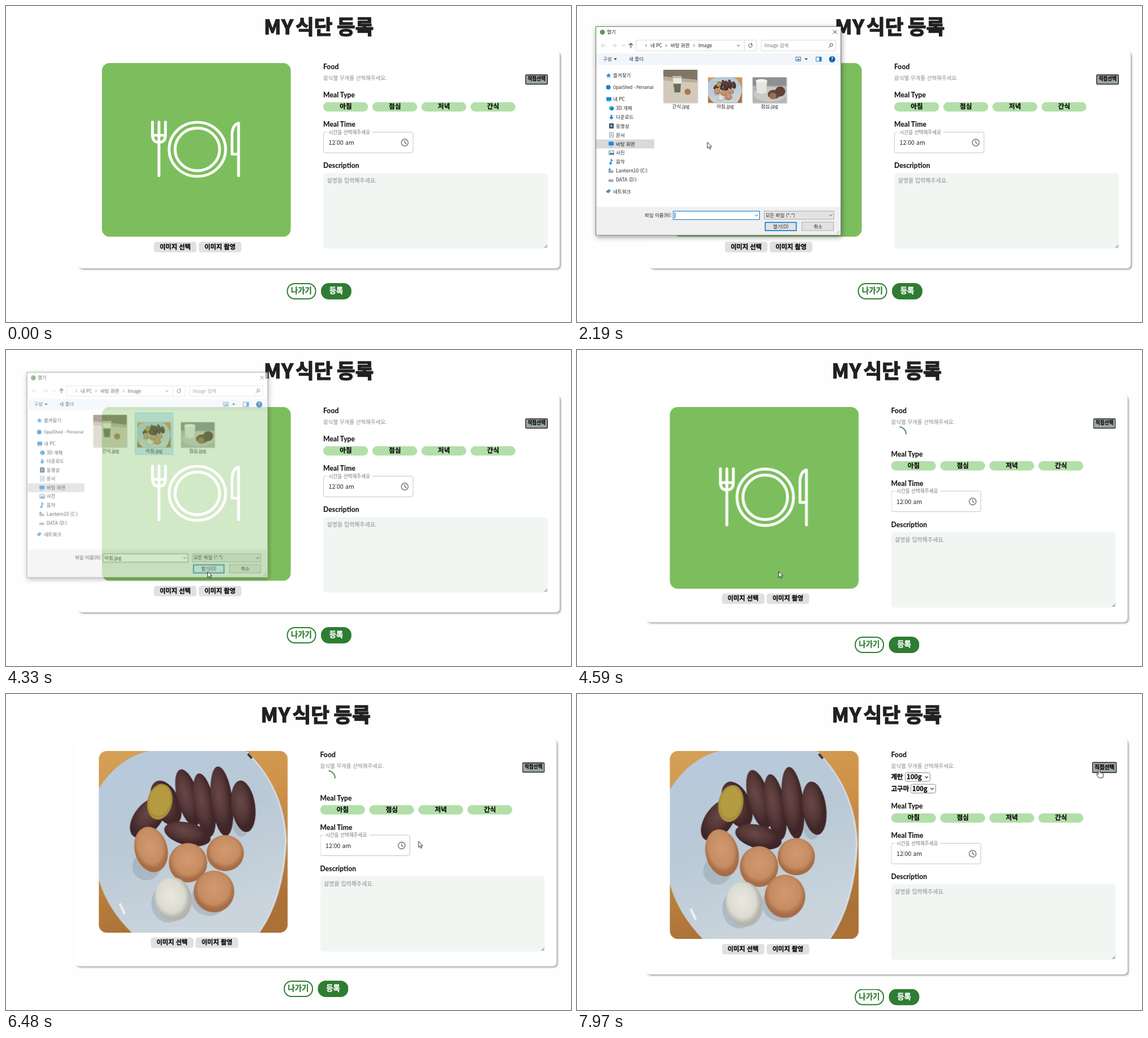
An HTML page that plays this animation: 1001 by 560 pixels, repeating every 8000 ms.

```html
<!DOCTYPE html>
<html lang="ko">
<head>
<meta charset="utf-8">
<title>식단 등록</title>
<style>
html, body { margin: 0; width: 100%; height: 100%; overflow: hidden; background: #fefefe; }
svg { display: block; width: 100vw; height: 100vh; }
text { font-family: 'Noto Sans CJK KR', 'Noto Sans CJK JP', 'Noto Sans KR', sans-serif; fill: #222; white-space: pre; }
.mid { text-anchor: middle; }
.heavy { font-weight: 900; color: #111; fill: currentColor; stroke: currentColor; stroke-width: .3; }
.title { font-size: 35.5px; color: #212121; stroke-width: 1.5; }
.label { font: 800 12.2px Lato, sans-serif; fill: #1a1a1a; }
.hint { fill: #8c8c8c; }
.line { fill: none; stroke: #444; }
.icon { fill: none; stroke: #fff; stroke-width: 5; stroke-linecap: round; stroke-linejoin: round; }
.small text { font-size: 8.5px; }
.potato { fill: url(#skin); }
.egg { fill: url(#shell); }

/* Page layout: picked file at 4590 ms, result at 6530 ms */
#page, #picture, #form, #imgButtons, #footer, #card, #spinnerBox, #weights, #photo,
#mark, #caret, #fileName, #field, #openButton, #pick, #arrow, #hand {
  animation: 8s step-end infinite;
}
#page { animation-name: page; }
#picture { transform: scaleY(.9565); animation-name: picture; }
#form { animation-name: form; }
#imgButtons { animation-name: imgButtons; }
#footer { animation-name: footer; }
#card { height: 385px; animation-name: card; filter: drop-shadow(2.5px 2.5px 1.5px rgba(0,0,0,.36)); }
#spinnerBox, #weights, #photo, #fileName, #mark, #hand { opacity: 0; }
#spinnerBox { animation-name: loading; }
#weights { animation-name: loaded; }
#photo { animation-name: photo; }
#spinner { transform-origin: 575.5px 149px; animation: spin 8s linear infinite; }
@keyframes page { 57.375% { transform: translateX(-5.5px); } 100% { transform: translateX(-5.5px); } }
@keyframes picture { 57.375% { transform: none; } 81.625% { transform: scaleY(1.0345); } }
@keyframes form { 57.375% { transform: translateY(26.5px); } 81.625% { transform: translateY(41px); } }
@keyframes imgButtons { 57.375% { transform: translateY(13.5px); } 81.625% { transform: translateY(25px); } }
@keyframes footer { 57.375% { transform: translateY(17px); } 81.625% { transform: translateY(31.5px); } }
@keyframes card { 57.375% { height: 402.5px; } 81.625% { height: 417px; } }
@keyframes loading { 57.375% { opacity: 1; } 81.625% { opacity: 0; } }
@keyframes loaded { 81.625% { opacity: 1; } }
@keyframes photo { 58.25% { opacity: 1; } }
@keyframes spin { 0%, 57.375% { transform: rotate(0); } 81.625%, 100% { transform: rotate(739deg); } }

/* File dialog */
#dialog { opacity: 0; transform-origin: 250px 221px; animation: dialog 8s linear infinite; filter: drop-shadow(1.5px 3px 5px rgba(0,0,0,.4)); }
#mark { fill: #e5f3ff; stroke: #e5f3ff; animation-name: mark; }
#caret { animation-name: caret; }
#fileName { animation-name: fileName; }
#field { fill: #fff; stroke: #0078d7; animation-name: field; }
#openButton { fill: #e1e1e1; stroke: #0078d7; stroke-width: 1.6; animation-name: openButton; }
@keyframes dialog {
  0%, 19.6% { opacity: 0; transform: scale(.93); }
  21.6%, 53.8% { opacity: 1; transform: none; }
  54.8%, 100% { opacity: 0; transform: scale(.95); }
}
@keyframes mark { 30% { opacity: 1; } 32.5% { opacity: 1; fill: #cce8ff; stroke: #99d1ff; } }
@keyframes caret { 32.5% { opacity: 0; } }
@keyframes fileName { 32.5% { opacity: 1; } }
@keyframes field { 32.5% { stroke: #8a8a8a; } }
@keyframes openButton { 40.8% { fill: #dcebf7; } }

/* Pointer */
#pointer { animation: move 8s linear infinite; }
#pick { transform-origin: 940px 130px; animation-name: grow; }
#arrow { animation-name: arrow; }
#hand { animation-name: hand; }
@keyframes move {
  0%, 2.9% { transform: translate(530px, 566px); animation-timing-function: ease-out; }
  10.75%, 12.3% { transform: translate(303px, 430px); }
  15% { transform: translate(309px, 433px); }
  17.5%, 24.3% { transform: translate(307px, 429px); }
  27.375% { transform: translate(230.5px, 242px); animation-timing-function: ease-out; }
  30.75%, 32.5% { transform: translate(260px, 150px); animation-timing-function: ease-in-out; }
  41.6% { transform: translate(355px, 390.5px); }
  43.25%, 61% { transform: translate(357px, 392.5px); animation-timing-function: ease-in; }
  67% { transform: translate(533px, 284px); animation-timing-function: ease-out; }
  75%, 87.8% { transform: translate(730.5px, 261px); animation-timing-function: ease-in-out; }
  93.75% { transform: translate(918px, 135px); }
  97.9% { transform: translate(922px, 133px); }
  99.4%, 100% { transform: translate(925px, 132.5px); }
}
@keyframes grow { 93.75% { transform: scale(1.1); } }
@keyframes arrow { 93.75% { opacity: 0; } }
@keyframes hand { 93.75% { opacity: 1; } }
</style>
</head>
<body>
<svg viewBox="0 0 1001 560">
<defs>
  <linearGradient id="wood" x2=".25" y2="1">
    <stop stop-color="#d5a159"/><stop offset=".4" stop-color="#cf9248"/><stop offset="1" stop-color="#ab7136"/>
  </linearGradient>
  <linearGradient id="plate" x2=".35" y2="1">
    <stop stop-color="#b6c9dd"/><stop offset=".5" stop-color="#bac9d6"/><stop offset="1" stop-color="#c9d4dc"/>
  </linearGradient>
  <radialGradient id="skin" cx=".4" cy=".4">
    <stop stop-color="#684947"/><stop offset=".6" stop-color="#573838"/><stop offset="1" stop-color="#402628"/>
  </radialGradient>
  <radialGradient id="shell" cx=".5" cy=".42">
    <stop stop-color="#d39a72"/><stop offset=".75" stop-color="#c68c62"/><stop offset="1" stop-color="#a66d46"/>
  </radialGradient>
  <radialGradient id="white" cx=".45" cy=".42">
    <stop stop-color="#e9e9e1"/><stop offset=".75" stop-color="#dbdbd2"/><stop offset="1" stop-color="#b3b5ac"/>
  </radialGradient>
  <clipPath id="frame"><rect width="334.5" height="322" rx="14"/></clipPath>

  <g id="food">
    <rect width="335" height="322" fill="url(#wood)"/>
    <path d="M0 66Q35 12 88 0H260Q330 66 333 160Q328 262 285 322H58Q14 278 0 228Z" fill="url(#plate)"/>
    <path d="M262 2Q328 66 331 160Q326 260 284 320" fill="none" stroke="#d3dee8" stroke-width="2.500"/>
    <path d="M37 270l9 19" stroke="#eef1f3" stroke-width="4"/>
    <path d="M264 5l7 8" stroke="#38383c" stroke-width="4"/>
    <g fill="#7b8a97" opacity=".3">
      <ellipse cx="84" cy="205" rx="25" ry="24"/><ellipse cx="123" cy="270" rx="30" ry="34"/>
      <ellipse cx="196" cy="262" rx="33" ry="30"/><ellipse cx="252" cy="112" rx="19" ry="40"/>
    </g>
    <g class="potato">
      <ellipse cx="87" cy="118" rx="24" ry="42" transform="rotate(38 87 118)"/>
      <ellipse cx="119" cy="92" rx="24" ry="42" transform="rotate(-24 119 92)"/>
      <ellipse cx="158" cy="83" rx="19" ry="52" transform="rotate(-15 158 83)"/>
      <ellipse cx="187" cy="96" rx="18" ry="57" transform="rotate(-10 187 96)"/>
      <ellipse cx="218" cy="89" rx="19" ry="62" transform="rotate(-7 218 89)"/>
      <ellipse cx="256" cy="98" rx="21" ry="46" transform="rotate(-8 256 98)"/>
      <ellipse cx="157" cy="147" rx="42" ry="20" transform="rotate(14 157 147)"/>
    </g>
    <ellipse cx="108" cy="90" rx="22" ry="32" transform="rotate(12 108 90)" fill="#a98f3a"/>
    <ellipse cx="108" cy="88" rx="18" ry="27" transform="rotate(12 108 88)" fill="#b59c43"/>
    <g class="egg">
      <ellipse cx="92.500" cy="174.500" rx="29" ry="41" transform="rotate(-15 92.5 174.5)"/>
      <ellipse cx="224" cy="181" rx="33" ry="32"/>
      <ellipse cx="158" cy="198" rx="34" ry="35"/>
      <ellipse cx="204" cy="249" rx="36" ry="37"/>
    </g>
    <ellipse cx="132" cy="262" rx="32.500" ry="39" transform="rotate(-12 132 262)" fill="url(#white)"/>
  </g>

  <g id="pill"><rect x="562" y="170.500" width="79.500" height="16.500" rx="8.250" fill="#b2dfa8"/></g>
  <g id="select">
    <rect x=".5" y=".5" width="44" height="15.500" rx="3" fill="#fff" stroke="#8a8a8a"/>
    <text class="heavy" x="3" y="12.300" font-size="11.300">100g</text>
    <path class="line" d="M35.500 7l2.700 2.700 2.700-2.700" stroke-width="1.400"/>
  </g>
  <path id="chevron" class="line" d="M-1.300-2.300L1-0L-1.300 2.300" stroke-width=".9"/>
  <path id="down" class="line" d="M-2.500-1.200L0 1.300L2.500-1.200" stroke-width="1"/>
  <path id="drop" d="M-2.800-1.300H2.800L0 1.800z" fill="#333"/>
  <g id="drive"><path d="M-5 0l2-2h6l2 2v2h-9z" fill="#b8bcc0"/><path d="M-4 2h8" stroke="#555"/></g>
  <g id="screen"><rect x="-4.500" y="-3.500" width="9" height="6.500" fill="#2189dc"/><path d="M-3 4.500h6" stroke="#7aa"/></g>
</defs>

<g id="page">
  <text class="heavy title" y="50"><tspan x="457" letter-spacing="1">MY</tspan><tspan x="513">식단</tspan><tspan x="586">등록</tspan></text>
  <rect id="card" x="128" y="80" width="853" rx="7" fill="#fff"/>

  <g transform="translate(170 101)">
    <g id="picture">
      <g clip-path="url(#frame)">
        <rect width="335" height="322" fill="#7cbe5d"/>
        <g class="icon">
          <path d="M89.500 109.500V133Q89.500 147 101 147T112.500 133V109.500M101 109.500V209M89.500 134H112.500"/>
          <circle cx="169" cy="160" r="50"/><circle cx="169" cy="160" r="39.500"/>
          <path d="M242 209V111.500Q230.500 115 230.500 134V169H242"/>
        </g>
        <use id="photo" href="#food"/>
      </g>
    </g>
  </g>

  <g id="imgButtons" class="mid" font-size="11.300">
    <rect x="262" y="418" width="75.500" height="18.500" rx="4.500" fill="#e0e0e0"/>
    <rect x="341.500" y="418" width="75.500" height="18.500" rx="4.500" fill="#e0e0e0"/>
    <text class="heavy" x="299.700" y="430.800">이미지 선택</text>
    <text class="heavy" x="379.200" y="430.800">이미지 촬영</text>
  </g>

  <text class="label" x="562" y="112">Food</text>
  <text class="hint" x="562" y="131" font-size="9.500">음식별 무게를 선택해주세요.</text>
  <g id="pick">
    <rect x="920.700" y="122" width="38.600" height="16.500" rx="1.500" fill="#9da8a0" stroke="#222" stroke-width="1.400"/>
    <text class="heavy mid" x="940" y="132.300" font-size="8.600">직접선택</text>
  </g>

  <g id="spinnerBox"><path id="spinner" d="M577.500 136.200A13 13 0 0 1 588.500 149" fill="none" stroke="#26702a" stroke-width="1.600" stroke-linecap="round"/></g>
  <g id="weights" font-size="11.500">
    <text class="heavy" x="562" y="151">계란</text><use href="#select" x="586.500" y="139"/>
    <text class="heavy" x="562" y="171.500">고구마</text><use href="#select" x="596.500" y="159.500"/>
  </g>

  <g id="form">
    <text class="label" x="562" y="162">Meal Type</text>
    <use href="#pill"/><use href="#pill" x="87"/><use href="#pill" x="174"/><use href="#pill" x="261"/>
    <g class="mid" font-size="11.600">
      <text class="heavy" x="602" y="182.300">아침</text><text class="heavy" x="689" y="182.300">점심</text>
      <text class="heavy" x="776" y="182.300">저녁</text><text class="heavy" x="863" y="182.300">간식</text>
    </g>
    <text class="label" x="562" y="214">Meal Time</text>
    <rect x="562.500" y="223.500" width="158.500" height="36.500" rx="3" fill="#fff" stroke="#c4c4c4"/>
    <rect x="568" y="222" width="81" height="3" fill="#fff"/>
    <text x="571.500" y="226.500" font-size="8.600" style="fill:#777">시간을 선택해주세요</text>
    <text x="571.500" y="246" font-size="10.600">12:00 am</text>
    <g class="line" style="stroke:#666" stroke-width="1.300"><circle cx="706.500" cy="242" r="6.100"/><path d="M706.500 238v4.300l3 2"/></g>
    <text class="label" x="562" y="287">Description</text>
    <rect x="562" y="296" width="398" height="134" rx="6" fill="#f1f6f3"/>
    <text class="hint" x="568.500" y="313" font-size="10">설명을 입력해주세요.</text>
    <path class="line" d="M954 428.500l5-5M957 428.500l2-2" stroke-width=".9"/>
  </g>

  <g id="footer" class="mid" font-size="13.400">
    <rect x="498.500" y="492" width="50" height="27" rx="13" fill="#fff" stroke="#2e7d32" stroke-width="2"/>
    <rect x="558" y="491" width="54" height="29" rx="14" fill="#2e7d32"/>
    <text class="heavy" x="523.300" y="509" style="color:#2e7d32">나가기</text>
    <text class="heavy" x="585" y="509" style="color:#fff">등록</text>
  </g>
</g>

<g id="dialog" class="small">
  <rect x="33.500" y="36.500" width="434" height="369.500" fill="#fff" stroke="#777"/>
  <circle cx="45" cy="46.300" r="4.400" fill="#5a9a52"/>
  <text x="53" y="49.300">열기</text>
  <path class="line" d="M453.500 42.500l7 7m0-7l-7 7" stroke-width="1"/>
  <path class="line" d="M51 70h-8m3.500-3.500l-3.500 3.500l3.500 3.500M62 70h8m-3.500-3.500l3.500 3.500l-3.500 3.500" style="stroke:#c4c4c4"/>
  <use href="#down" x="82" y="70" opacity=".4"/>
  <path class="line" d="M95.500 74.500v-8.500m-3.500 3.500l3.500-3.500l3.500 3.500" stroke-width="1.200"/>
  <path d="M104.500 60.500H318.500V79.500H104.500zM296.500 60.500V79.500M326.500 60.500H458.500V79.500H326.500z" fill="none" stroke="#dadada"/>
  <use href="#chevron" x="122.500" y="70"/><use href="#chevron" x="158" y="70"/><use href="#chevron" x="207.500" y="70"/>
  <text y="73"><tspan x="130">내 PC</tspan><tspan x="166">바탕 화면</tspan><tspan x="215">Image</tspan><tspan x="332" fill="#777">Image 검색</tspan></text>
  <use href="#down" x="286" y="70"/>
  <path class="line" d="M309 67.500a3.200 3.200 0 1 1-3.500-.2M309.500 65v3h-3"/>
  <g class="line"><circle cx="450.500" cy="69" r="2.500"/><path d="M448.700 71l-3 3"/></g>

  <rect x="34" y="84" width="433" height="20.500" fill="#f2f6fb"/>
  <text y="97" style="fill:#1e395b"><tspan x="46">구성</tspan><tspan x="92">새 폴더</tspan></text>
  <use href="#drop" x="68" y="94"/><use href="#drop" x="406" y="94"/>
  <path d="M387.500 90.500h9v7h-9z" fill="#dbe9f5" stroke="#678"/><path d="M389 96l3-3 4 3z" fill="#2189dc"/>
  <path d="M423.500 90.500h9.500v7.500h-9.500z" fill="#fff" stroke="#456e9a"/><path d="M429 91h4v7h-4z" fill="#2189dc"/>
  <circle cx="452" cy="94.300" r="5.500" fill="#0a5cad"/>
  <text class="mid" x="452" y="97.300" style="fill:#fff;font-weight:700">?</text>

  <rect x="34" y="236.500" width="103" height="16" fill="#d9d9d9"/>
  <text>
    <tspan x="64" y="126">즐겨찾기</tspan><tspan x="64" y="147" font-size="7.500">OpalShed - Personal</tspan><tspan x="64" y="168">내 PC</tspan>
    <tspan x="69" y="184">3D 개체</tspan><tspan x="69" y="200">다운로드</tspan><tspan x="69" y="215.500">동영상</tspan>
    <tspan x="69" y="231.500">문서</tspan><tspan x="69" y="247.500">바탕 화면</tspan><tspan x="69" y="263">사진</tspan>
    <tspan x="69" y="279">음악</tspan><tspan x="69" y="295">Lantern10 (C:)</tspan><tspan x="69" y="311">DATA (D:)</tspan>
    <tspan x="64" y="331.500">네트워크</tspan>
  </text>
  <path d="M56 118.500l1.400 3 3.300.3-2.500 2.200.8 3.300-3-1.700-3 1.700.8-3.300-2.500-2.200 3.300-.3z" fill="#2b93e2"/>
  <circle cx="55.500" cy="144" r="4" fill="#1680d0"/>
  <use href="#screen" x="56.500" y="165"/><use href="#screen" x="60.500" y="244"/>
  <path d="M61 177l4 2v4.500l-4 2-4-2v-4.500z" fill="#28a9d6"/><path d="M61 181l4-2v4.500l-4 2z" fill="#157da6"/>
  <path d="M59.500 193h3v4h2.500l-4 4.500-4-4.500h2.500z" fill="#2784d6"/>
  <path d="M57 208h8v9h-8z" fill="#394d60"/><path d="M59 210h4v5h-4z" fill="#6aa6d2"/>
  <path d="M57.500 224h7v8.500h-7z" fill="#f5f8fa" stroke="#89a"/><path d="M59 227h4M59 229.500h4" stroke="#6d9cc4"/>
  <path d="M56.500 256.500h9v7h-9z" fill="#dceaf4" stroke="#899"/><path d="M57 263l3-3.500 2 1.500 3-1v3z" fill="#2189b8"/>
  <path d="M60.500 279v-7l3 2.500" fill="none" stroke="#1d86dc" stroke-width="1.600"/><circle cx="59.300" cy="279" r="2" fill="#1d86dc"/>
  <use href="#drive" x="60" y="292.500"/><path d="M56 288h3.500v3.500H56z" fill="#28a4df"/><use href="#drive" x="60" y="308.500"/>
  <path d="M51 329l5-4.500 4 2.500-4.500 5z" fill="#3c91cd"/><path d="M56 324.500l4 2.500-2 2.500z" fill="#7c93a5"/>

  <rect id="mark" x="228.500" y="109.500" width="68" height="75"/>
  <g transform="translate(153 113)">
    <rect x=".5" y=".5" width="61" height="59" fill="#777" opacity=".35"/>
    <path d="M0 0h60v58H0z" fill="#d2c9bb"/><path d="M0 0h60v18L0 12z" fill="#817664"/><path d="M0 12l60 6v5L0 19z" fill="#b9ad9b"/>
    <path d="M16 11h17l-3 30H19z" fill="#b9bcb2"/><path d="M18 25h13l-1 15H20z" fill="#68705b"/>
    <path d="M17 15h15v9H18z" fill="#ede9df"/><circle cx="43" cy="39" r="5.500" fill="#aa774e"/>
  </g>
  <rect x="232.500" y="126.500" width="61" height="46" fill="#777" opacity=".35"/>
  <use href="#food" transform="translate(232 126.500) scale(.179 .1398)"/>
  <g transform="translate(311 126.500)">
    <rect x=".5" y=".5" width="61" height="46" fill="#777" opacity=".35"/>
    <path d="M0 0h60v45H0z" fill="#b4b6b6"/><path d="M0 0h60v15H0z" fill="#8c9294"/><ellipse cx="31" cy="30" rx="29" ry="13" fill="#ccc9c3"/>
    <path d="M6 5h20l-2 22q-8 4-16 0z" fill="#e7e5df"/><ellipse cx="16" cy="6" rx="10" ry="3" fill="#f5f4ef"/>
    <ellipse cx="38" cy="30" rx="11" ry="8" fill="#69493b"/><ellipse cx="49" cy="25" rx="9" ry="9" fill="#5f4337"/><ellipse cx="36" cy="33" rx="6" ry="6" fill="#947255"/>
  </g>
  <g class="mid"><text x="184" y="181">간식.jpg</text><text x="262.500" y="181">아침.jpg</text><text x="341" y="181">점심.jpg</text></g>

  <rect x="34" y="356" width="433" height="49.500" fill="#f0f0f0"/>
  <text x="120" y="373.500">파일 이름(N):</text>
  <rect id="field" x="170.500" y="363.500" width="153" height="15"/>
  <path id="caret" d="M173.500 366v10" stroke="#222"/>
  <text id="fileName" x="173" y="374">아침.jpg</text>
  <use href="#down" x="318" y="371"/>
  <rect x="331.500" y="363.500" width="123.500" height="14.500" fill="#e3e3e3" stroke="#adadad"/>
  <text x="334" y="373.500">모든 파일 (*.*)</text>
  <use href="#down" x="449.500" y="371"/>
  <rect id="openButton" x="333.500" y="383.500" width="55" height="14.500"/>
  <rect x="398.500" y="383" width="56" height="15" fill="#e1e1e1" stroke="#adadad"/>
  <g class="mid"><text x="361" y="393.800">열기(O)</text><text x="427" y="393.800">취소</text></g>
  <path d="M459 404l6-6M462 404l3-3" stroke="#aaa"/>
</g>

<g id="pointer" fill="#fff" stroke="#111" stroke-width=".9" stroke-linejoin="round">
  <path id="arrow" d="M.3 0V10.800L2.800 8.500L4.500 12.300L6.300 11.500L4.600 7.800H8z"/>
  <path id="hand" d="M-1.300 1.200Q0-.7 1.300 1.200V6.500L6 7.600Q8 8.200 7.600 10.500L6.500 16H-.5L-4.500 10.500Q-5.200 8.800-3.300 8.800L-1.300 10z"/>
</g>
</svg>
</body>
</html>
```
